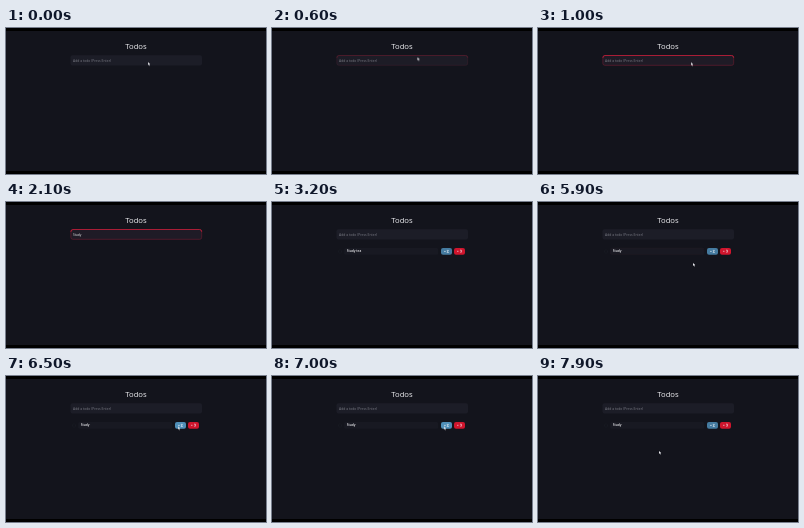
Recreate the animation shown at these times as an HTML page. Size 260x146 px, loop 8 s.

```html
<!DOCTYPE html>
<html lang="en">
<head>
<meta charset="utf-8">
<title>Todos</title>
<style>
  html, body { margin: 0; width: 100%; height: 100%; overflow: hidden; background: #000; }
  svg { display: block; width: 100vw; height: 100vh; }
  text { font-family: "Open Sans", "Noto Sans", sans-serif; fill: #f2f2f5; }
  .title { font-size: 7.7px; text-anchor: middle; }
  .hint { font-size: 3.4px; fill: #7c7d87; }
  .entry { font-size: 3.2px; }
  .task { font-size: 3.2px; font-weight: 600; }
  .icon { fill: none; stroke: #eef2f6; stroke-width: .6; }

  .anim { animation: 8s linear infinite; }
  .steps { animation: 8s step-end infinite; }

  .glow { opacity: 0; animation-name: glow; }
  .hint { animation-name: hint; }
  .entry { animation-name: entry; }
  .item { animation-name: item; }
  .edit { animation-name: edit; }
  .task { animation-name: task; }
  .squiggle { animation-name: squiggle; }
  .blue { animation-name: hover; }
  .show { animation-name: show; }
  .pointer { animation-name: move; }

  @keyframes glow {
    0%, 6.25% { opacity: 0; }
    10%, 39.99% { opacity: 1; }
    40%, 100% { opacity: 0; }
  }
  @keyframes hint {
    0% { opacity: 1; }
    18.75% { opacity: 0; }
    40%, 100% { opacity: 1; }
  }
  /* each inset uncovers one more letter */
  @keyframes entry {
    0% { clip-path: inset(-1px 100% -1px 0); }
    18.75% { clip-path: inset(-1px 85% -1px 0); }
    21.25% { clip-path: inset(-1px 78% -1px 0); }
    22.5% { clip-path: inset(-1px 65% -1px 0); }
    23.75% { clip-path: inset(-1px 51% -1px 0); }
    25%, 26.25% { clip-path: inset(-1px 37% -1px 0); }
    32.5% { clip-path: inset(-1px 25% -1px 0); }
    35% { clip-path: inset(-1px 13% -1px 0); }
    36.25% { clip-path: inset(-1px 0 -1px 0); }
    40%, 100% { clip-path: inset(-1px 100% -1px 0); }
  }
  @keyframes item {
    0% { opacity: 0; }
    40%, 100% { opacity: 1; }
  }
  @keyframes edit {
    0% { opacity: 0; }
    51.25% { opacity: 1; }
    80%, 100% { opacity: 0; }
  }
  @keyframes task {
    0% { clip-path: inset(-1px 0 -1px 0); }
    62.5% { clip-path: inset(-1px 25% -1px 0); }
    63.75%, 100% { clip-path: inset(-1px 37% -1px 0); }
  }
  @keyframes squiggle {
    0% { opacity: 0; }
    58.75% { opacity: .7; }
    62.5%, 100% { opacity: 0; }
  }
  @keyframes hover {
    0%, 78.75% { fill: #457ba0; }
    81.25%, 88.75% { fill: #4f8fb8; }
    91.25%, 100% { fill: #457ba0; }
  }
  @keyframes show {
    0% { opacity: 1; }
    18.75% { opacity: 0; }
    41.25% { opacity: 1; }
    58.75% { opacity: 0; }
    73.75%, 100% { opacity: 1; }
  }
  @keyframes move {
    0%, 1.24% { transform: translate(142px, 34.2px); }
    1.25%, 3.74% { transform: translate(135px, 13px); }
    5% { transform: translate(138px, 22px); }
    8.75% { transform: translate(149px, 33px); }
    12.5%, 41.2% { transform: translate(153px, 34.4px); }
    41.25% { transform: translate(153px, 36px); }
    48.75%, 73.7% { transform: translate(153px, 48px); }
    73.75% { transform: translate(155px, 61px); }
    75%, 76.25% { transform: translate(155px, 58px); }
    81.25%, 87.5% { transform: translate(172px, 50.5px); }
    92.5%, 97.4% { transform: translate(126px, 71.5px); }
    98.75%, 100% { transform: translate(121px, 75px); }
  }
</style>
</head>
<body>
<svg viewBox="0 0 260 146" preserveAspectRatio="none">
  <rect width="260" height="146" fill="#000"/>
  <rect y="3" width="260" height="140" fill="#13141c"/>
  <text class="title" x="130" y="20.9">Todos</text>

  <rect x="64.5" y="27.2" width="131.5" height="10.2" rx="2" fill="#1c1d27"/>
  <g class="glow anim">
    <rect x="64.9" y="27.5" width="130.8" height="9.8" rx="2" fill="#1f1b26" stroke="#6e1c2e" stroke-width=".6"/>
    <path d="M65 30V29.5Q65 27.5 67 27.5H193.6Q195.6 27.5 195.6 29.5V30" fill="none" stroke="#b51f38" stroke-width=".9"/>
  </g>
  <text class="hint steps" x="67" y="33.7">Add a todo (Press Enter)</text>
  <text class="entry steps" x="67" y="33.7">Study tea</text>

  <g class="item steps">
    <rect x="66.5" y="48" width="3" height="3" rx=".7" fill="none" stroke="#1d1e27" stroke-width=".5"/>
    <rect x="72.2" y="45.9" width="94" height="6.9" rx="1.5" fill="#181922"/>
    <rect class="edit steps" x="72.4" y="46.1" width="93.6" height="6.5" rx="1.5" fill="#191922" stroke="#211a23" stroke-width=".5"/>
    <text class="task steps" x="74.8" y="50.2">Study tea</text>
    <path class="squiggle steps" d="M84.5 51h4.5" stroke="#b32a40" stroke-width=".5"/>
    <rect class="blue anim" x="169" y="46" width="11" height="6.7" rx="2" fill="#457ba0"/>
    <path class="icon" d="M172 49.4h1.8M174.8 48.4h1.6l-1.4 2h1.9"/>
    <rect x="182" y="46" width="11" height="6.7" rx="2" fill="#cf152d"/>
    <path class="icon" d="M185 49.3h1.5M188 48.2h1.4v2h-1.2"/>
  </g>

  <g class="show steps">
    <path class="pointer anim" d="M0 0V2.9L.7 2.3 1.3 3.5 1.9 3.2 1.4 2.1H2.2Z" fill="#e8e8ec"/>
  </g>
</svg>
</body>
</html>
```
